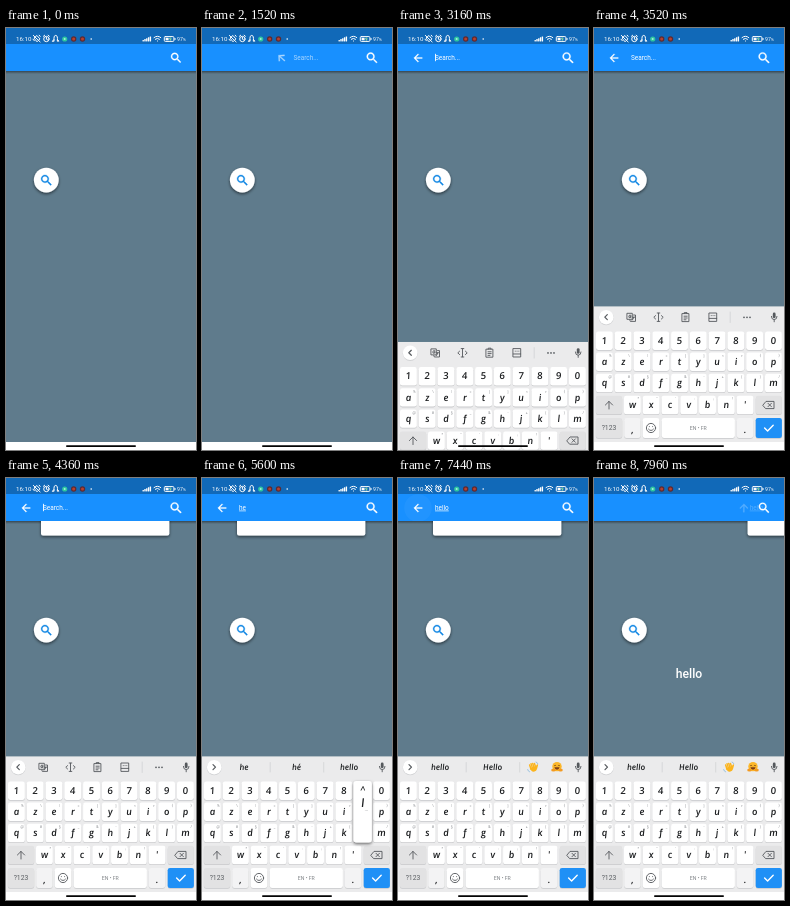
Animation, 190 px wide and 422 px high, one loop 8 s. Source, as an HTML page:

```html
<!DOCTYPE html>
<html lang="en">
<head>
<meta charset="utf-8">
<title>Search bar</title>
<style>
html, body { margin: 0; width: 100%; height: 100%; overflow: hidden; background: #5f7b8c; }
svg { display: block; width: 100vw; height: 100vh; }
text { font-family: Roboto, "Open Sans", sans-serif; white-space: pre; }
.key, .word {
  font: italic 600 9.6px "Open Sans", "Noto Sans", sans-serif; fill: #1d1f21; text-anchor: middle;
  transform-box: fill-box; transform-origin: center; transform: skewX(6deg);
}
.num { font-style: normal; font-size: 9.6px; transform: skewX(-3deg); }
.word { font-size: 8.2px; }
.big { font-size: 11.5px; }
.hint, .plain { font-size: 3.6px; fill: #808488; text-anchor: middle; }
.plain { font-size: 5.2px; }
.mode { font-size: 6.8px; fill: #5b5f63; }
.line { fill: none; stroke: #55595d; stroke-width: .9; stroke-linecap: round; stroke-linejoin: round; }
.bold { stroke-width: 1.2; }
.white { fill: none; stroke: #fff; stroke-width: 1; stroke-linecap: round; stroke-linejoin: round; }
.tick { stroke-width: 1.4; }
.rule { stroke: #c9cbcd; stroke-width: .6; }
.wave { stroke: #6aa9d8; stroke-width: .6; }
.eyes { stroke: #704214; stroke-width: .7; }
#query { text-decoration-thickness: .4px; }
</style>
</head>
<body>
<svg viewBox="0 0 190 422" preserveAspectRatio="none">
  <defs>
    <linearGradient id="shade" x2="0" y2="1">
      <stop stop-color="#000" stop-opacity=".42"/>
      <stop offset="1" stop-color="#000" stop-opacity="0"/>
    </linearGradient>
    <filter id="lift" x="-40%" y="-40%" width="180%" height="200%">
      <feDropShadow dx="0" dy="1.4" stdDeviation="1.4" flood-color="#000" flood-opacity=".58"/>
    </filter>
    <clipPath id="barClip"><rect y="16" width="190" height="27"/></clipPath>
    <path id="lens" d="M15.5 14h-.79l-.28-.27C15.41 12.59 16 11.11 16 9.5 16 5.91 13.09 3 9.5 3S3 5.91 3 9.5 5.91 16 9.5 16c1.61 0 3.09-.59 4.23-1.57l.27.28v.79l5 4.99L20.49 19l-4.99-5zm-6 0C7.01 14 5 11.99 5 9.5S7.01 5 9.5 5 14 7.01 14 9.5 11.99 14 9.5 14z"/>
  </defs>

  <rect width="190" height="422" fill="#5f7b8c"/>
  <text id="result" x="95" y="200" font-size="12.2" font-weight="500" fill="#fff" text-anchor="middle">hello</text>
  <g filter="url(#lift)"><circle cx="40.3" cy="152.1" r="12.4" fill="#fff"/></g>
  <use href="#lens" fill="#1287e4" stroke="#1287e4" stroke-width=".5" transform="translate(40.3 152.2) scale(.6) translate(-11.75 -11.75)"/>

  <rect y="43" width="190" height="3" fill="url(#shade)"/>
  <g id="panel" filter="url(#lift)">
    <path d="M35 40h128.3v15.5q0 2-2 2H37q-2 0-2-2z" fill="#fff"/>
  </g>
  <rect width="190" height="43" fill="#1890ff"/>
  <rect width="190" height="16" fill="#1169b8"/>
  <g id="status"></g>

  <g clip-path="url(#barClip)">
    <circle id="ripple" cx="20" cy="30" fill="#fff"/>
    <g id="field">
      <path id="arrow" fill="#fff" stroke="#fff" stroke-width=".5" d="M20 11H7.83l5.59-5.59L12 4l-8 8 8 8 1.41-1.41L7.83 13H20v-2z"/>
      <text id="query" y="31.6" font-size="6.45" fill="#fff"></text>
      <rect id="caret" y="25.8" width=".9" height="7.4" fill="#fff"/>
    </g>
    <use id="loupe" href="#lens" fill="#fff" stroke="#fff" stroke-width=".5"/>
  </g>

  <rect y="414" width="190" height="8" fill="#fff"/>
  <g id="board"></g>
  <rect x="60" y="417.2" width="70" height="1.8" rx=".9" fill="#050505"/>
</svg>

<script>
const $ = id => document.getElementById(id);
const clamp = v => Math.max(0, Math.min(1, v));
const ramp = (t, start, length) => clamp((t - start) / length);
const show = (id, on) => $(id).setAttribute('display', on ? 'inline' : 'none');
const move = (id, value) => $(id).setAttribute('transform', value);

const LOOP = 8000;
const OPEN = 1200, CLOSE = 7680, SLIDE = 450;
const FOCUS = 2960, KEYS_UP = 3012, PANEL = 3640;
const TYPED = [[4640, 'h'], [5060, 'e'], [5640, 'l'], [6100, 'l'], [6620, 'o']];
const ROW_Y = [312.7, 333.8, 355, 377, 400];
const PITCH = 18.78;
const GREY = '#e2e2e3', PALE = '#f3f3f4';
const spots = {};

const escape = s => s.replace(/&/g, '&amp;').replace(/</g, '&lt;');
const label = (x, y, s, cls) => `<text class="${cls}" x="${x}" y="${y}">${escape(s)}</text>`;
const line = (d, cls = '') => `<path class="line ${cls}" d="${d}"/>`;
const rect = (x, y, w, h, r, fill) =>
  `<rect x="${x}" y="${y}" width="${w}" height="${h}" rx="${r}" fill="${fill}"/>`;
const disc = (x, y, r, fill) => `<circle cx="${x}" cy="${y}" r="${r}" fill="${fill}"/>`;

function cap(x, y, w, fill = '#fff', h = 18.4) {
  const left = x - w / 2, top = y - h / 2;
  return rect(left, top + .8, w, h, 2.3, '#c8c9cb') + rect(left, top, w, h, 2.3, fill);
}

function keyRow(chars, hints, row, x0) {
  const y = ROW_Y[row];
  return [...chars].map((c, i) => {
    const x = x0 + i * PITCH;
    spots[c] = [x, y];
    return cap(x, y, 16.9) + label(x, y + 3.2, c, row ? 'key' : 'key num') +
      (hints[i] ? label(x + 5.8, y - 4.8, hints[i], 'hint') : '');
  }).join('');
}

function tools() {
  return line('M13.3 286.7l-2.5 2.5l2.5 2.5', 'bold') +
    line('M33.3 285.3h5v6h-5zM37 287.3q-1.8-1.2-2.2 1t2.2 1v-1h-1M39.5 287h2v6.4h-5.2l-.5-1.4M38.6 289.2h2.2M39.7 289.2q-.2 2-1.5 3') +
    line('M64.5 285.2v8M63.2 285h2.6M63.2 293.4h2.6M61.6 287.6l-1.8 1.7l1.8 1.7M67.4 287.6l1.8 1.7l-1.8 1.7') +
    line('M88.3 285.6h6.6v8h-6.6zM90.2 285.6v-1h2.8v1M90 288.2h3.2M90 290h3.2M90 291.8h2') +
    line('M115.3 285h7.4v8.4h-7.4zM115.3 290.4h7.4M117.2 287.6h.1M119 287.6h.1M120.8 287.6h.1') +
    line('M136.2 284v10.5', 'rule') +
    [150, 153, 156].map(x => disc(x, 289.3, .85, '#55595d')).join('');
}

const hand = '<g transform="translate(135 289) rotate(-18)">' +
  [-2.6, -.9, .8, 2.4].map((x, i) => rect(x - .7, -4.6 + Math.abs(i - 1.4) * .6, 1.5, 6, .75, '#fbb41d')).join('') +
  '<path d="M-3.3 0h6.4l1.7-1.4q1.2.4.4 1.6l-2 3q-1.3 1.8-3.2 1.6q-3.2-.2-3.3-4.8z" fill="#fbb41d"/></g>' +
  line('M129.6 291.5q.3 1.8 2 2.4M138 284q1.5.3 1.9 1.8', 'wave');
const hug = disc(159, 288.6, 4.7, '#fcb72a') +
  line('M156.3 287.6q.8-1 1.6 0M160.1 287.6q.8-1 1.6 0', 'eyes') +
  '<path d="M156.4 289.3h5.2q-.5 2.4-2.6 2.4t-2.6-2.4z" fill="#7b3c18"/>' +
  [155.5, 162.5].map(x => `<ellipse cx="${x}" cy="292" rx="2.3" ry="1.6" fill="#f39a20"/>`).join('');

const GUESSES = {
  h: ['h', 'he', 'hello'], he: ['he', 'hé', 'hello'], hel: ['hel', 'hello', 'help'],
  hell: ['hell', 'hello', 'Hell'], hello: ['hello', 'Hello']
};

function strip(word) {
  if (!word) return tools();
  return line('M11 286.7l2.5 2.5l-2.5 2.5', 'bold') +
    GUESSES[word].map((s, i) => label(42 + i * 52.5, 292, s, 'word')).join('') +
    line('M68.2 284.5v9.5M121.7 284.5v9.5', 'rule') + (word === 'hello' ? hand + hug : '');
}

function buildBoard() {
  const [, , , y4, y5] = ROW_Y;
  const low = (x, w, fill) => cap(x, y5, w, fill, 20);
  $('board').innerHTML = rect(0, 278.4, 190, 136, 0, '#ebebec') + rect(0, 414, 190, 8, 0, '#fff') +
    disc(12.2, 289.8, 7.5, '#d2d3d5') + disc(12.2, 289.2, 7.3, '#fff') + '<g id="strip"></g>' +
    rect(178.8, 284.6, 2.8, 5.6, 1.4, '#55595d') + line('M177.4 288.4q0 3.2 2.8 3.2t2.8-3.2M180.2 291.8v2') +
    keyRow('1234567890', '', 0, 10.4) +
    keyRow('azertyuiop', '%\\|=[]<>{}', 1, 10.4) +
    keyRow('qsdfghjklm', '@#$_&-+()/', 2, 10.4) +
    keyRow("wxcvbn'", '*"\':;!', 3, 38.4) +
    cap(15, y4, 26.3, GREY) + line(`M15 ${y4 + 4}v-7.6m-3.6 3.6l3.6-3.6l3.6 3.6`) +
    cap(174.8, y4, 26, GREY) +
    line(`M169 ${y4}l3-3.6h8v7.2h-8zM174 ${y4 - 1.7}l3.4 3.4m0-3.4l-3.4 3.4`) +
    low(15, 26.3, GREY) + label(15, y5 + 2.4, '?123', 'plain mode') +
    low(38.4, 16.4, PALE) + label(38.4, y5 + 5, ',', 'key') +
    low(57, 16.6, '#fff') + `<circle class="line" cx="57" cy="${y5}" r="4.6"/>` +
    line(`M55.3 ${y5 - 1.4}h.1M58.6 ${y5 - 1.4}h.1M54.5 ${y5 + 1.1}q2.5 3 5 0`) +
    low(104.3, 73.2, '#fff') + label(104.3, y5 + 2, 'EN • FR', 'plain') +
    low(151, 16.4, PALE) + label(151, y5 + 5, '.', 'key') +
    low(174.8, 26.2, '#1f90f6') + `<path class="white tick" d="M170.6 ${y5}l3 3l5.6-5.8"/>` +
    '<g id="popup"></g>';
}

function buildStatus() {
  const bars = [0, 1, 2, 3, 4].map(i => rect(136.5 + i * 1.8, 12 - i * .9, 1.4, 1.4 + i * .9, .3, '#fff')).join('');
  const stroke = d => `<path class="white" d="${d}"/>`;
  $('status').innerHTML = '<text x="10" y="13.2" font-size="6.2" fill="#fff">16:10</text>' +
    stroke('M28.3 9.8l2.6-2.3l3 3.4l-2.6 2.6zM27.3 7.4l6.8 6.5M27 11.2l1.4 1.6M33.2 7.2l1 1.2') +
    '<circle class="white" cx="40.4" cy="11" r="2.7"/>' + stroke('M40.4 9.4v1.8l1.2.7M37.4 8.3l1.3-1.1M43.4 8.3l-1.3-1.1') +
    stroke('M46.6 13.2h1.5q-.7-5.8 1.6-5.8t1.6 5.8h1.5l-1.2-1.6M46.6 13.2l1.2-1.6') +
    disc(58.7, 11, 2.6, '#2ec6a0') + disc(58.7, 11, 1, '#a6eedb') +
    [67.7, 76.5].map(x => disc(x, 11, 2.7, '#5d2b32') + disc(x, 11, 1.5, '#b8402f')).join('') +
    disc(85.2, 11, .8, '#fff') + bars +
    stroke('M148 9.6q3.4-2.8 6.8 0M149.3 11.2q2.1-1.7 4.2 0M151.4 13h.1') +
    stroke('M159.3 8.6h7.6q1 0 1 1v2.8q0 1-1 1h-7.6q-1 0-1-1v-2.8q0-1 1-1zM169 10.4v1.2') +
    rect(159.6, 9.8, 3, 2.4, .3, '#fff') +
    '<path d="M164.6 8.6l-1.8 2.7h1.5l-.8 2.4l2.5-3.2h-1.7z" fill="#9be89f"/>' +
    '<text x="171" y="13" font-size="5.2" fill="#fff">97<tspan font-size="4.4">%</tspan></text>';
}

let stripWord = null, popupKey = null;

function drawPopup(key) {
  if (key === popupKey) return;
  popupKey = key;
  if (!key) return void ($('popup').innerHTML = '');
  const [x, y] = spots[key];
  $('popup').innerHTML = `<g filter="url(#lift)">${rect(x - 9.2, y - 52, 18.4, 61.5, 3, '#fff')}</g>` +
    (key === 'l' ? label(x, y - 40, '^', 'key') : '') +
    label(x, y - 25.5, key, 'key big') + label(x + 3.5, y - 22, '…', 'plain');
}

function draw(t) {
  const word = TYPED.filter(k => t >= k[0]).map(k => k[1]).join('');
  const p = ramp(t, OPEN, SLIDE) - ramp(t, CLOSE, SLIDE);
  const q = 1 - p, shift = 190 * q;

  // Sliding search field
  $('field').setAttribute('opacity', p ** 1.4);
  move('arrow', `translate(${20 + 208 * q} 30) rotate(${Math.min(180, 146 * q)}) scale(.53) translate(-12 -12)`);
  const query = $('query'), shown = word || 'Search...';
  if (query.textContent !== shown) query.textContent = shown;
  query.setAttribute('x', 37 + shift);
  query.setAttribute('text-decoration', word ? 'underline' : 'none');
  move('loupe', `translate(170 29.8) scale(${.57 + .05 * p}) translate(-11.75 -11.75)`);

  const lastEdit = TYPED.reduce((a, k) => t >= k[0] ? k[0] : a, FOCUS);
  show('caret', t >= FOCUS && t < CLOSE && (t - lastEdit) % 1000 < 500);
  $('caret').setAttribute('x', 37 + shift + (word ? query.getComputedTextLength() + .3 : 0));

  show('panel', t >= PANEL);
  move('panel', `translate(${shift} 0)`);
  show('result', t >= CLOSE);

  const press = ramp(t, 7300, 200);
  $('ripple').setAttribute('r', 6 + 11 * press);
  $('ripple').setAttribute('opacity', t < 7300 ? 0 : .045 * (1 - ramp(t, 7560, 240)));

  // Keyboard
  const rise = ramp(t, KEYS_UP, 400);
  show('board', rise > 0);
  move('board', `translate(0 ${144 * (1 - rise) ** 3})`);
  if (word !== stripWord) $('strip').innerHTML = strip(stripWord = word);
  const pressed = TYPED.find(k => t >= k[0] - 90 && t < k[0] + 70);
  drawPopup(pressed ? pressed[1] : null);
}

buildStatus();
buildBoard();
const begin = performance.now();
function tick() {
  draw((performance.now() - begin) % LOOP);
  requestAnimationFrame(tick);
}
tick();
</script>
</body>
</html>
```
